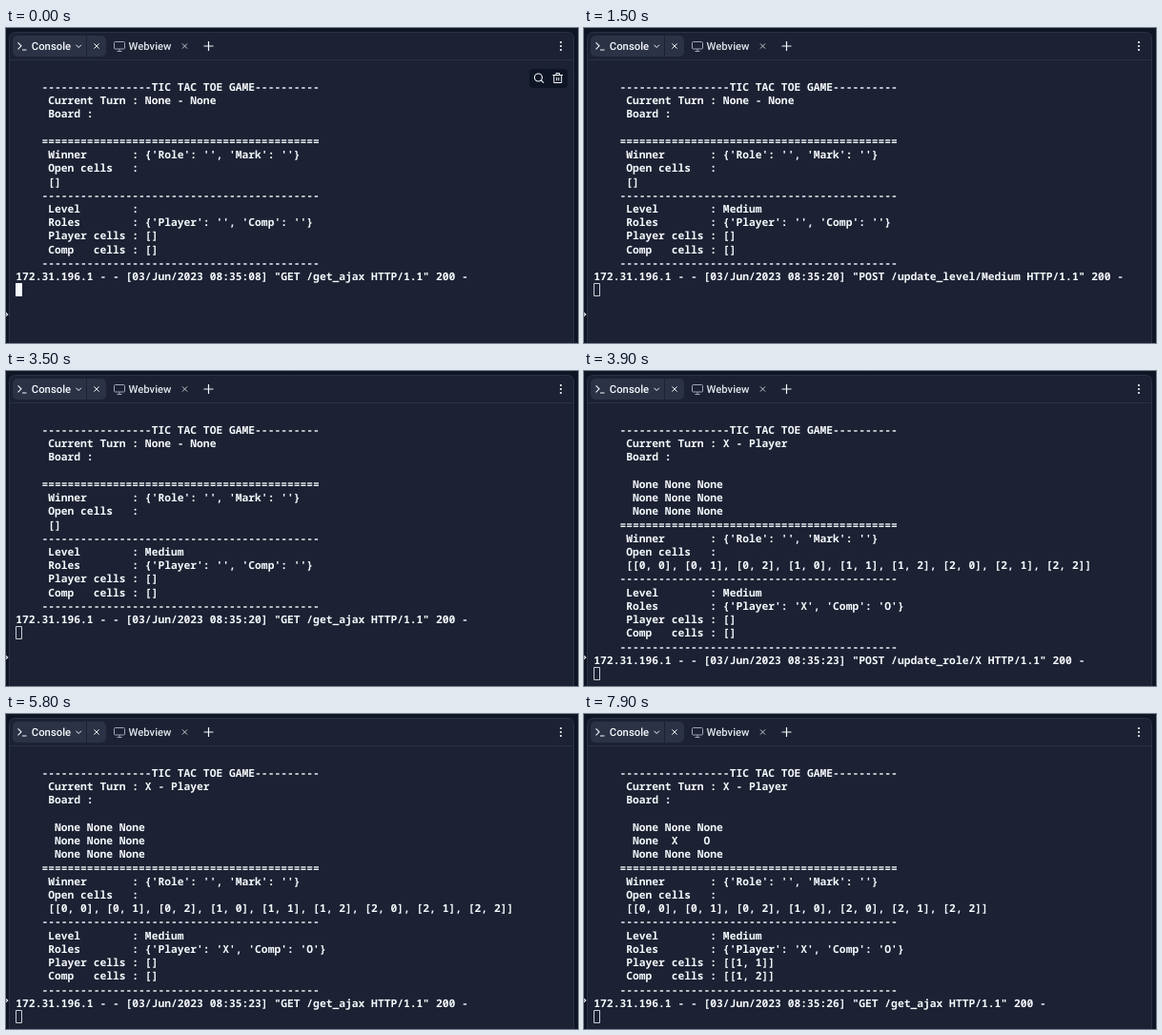
Recreate the animation shown at these times as an HTML page with a canvas. Size 600 by 331 pixels, loop 8 s.

```html
<!DOCTYPE html>
<html lang="en">
<head>
<meta charset="utf-8">
<title>Console</title>
<style>
  html, body { margin: 0; width: 100%; height: 100%; overflow: hidden; background: #0e1525; }
  canvas { display: block; width: 600px; height: 331px; }
</style>
</head>
<body>
<canvas id="stage"></canvas>
<script>
const W = 600, H = 331, LOOP = 8000;
const canvas = document.getElementById('stage');
const ctx = canvas.getContext('2d');
const ratio = window.devicePixelRatio || 1;
canvas.width = W * ratio;
canvas.height = H * ratio;

const color = { page: '#0e1525', panel: '#1c2133', raised: '#2b3245', text: '#f5f9fc', dim: '#9ea5b3' };
const term = { x: 10.3, y: 51.7, row: 14.23, font: '600 11.3px "Noto Sans Mono", monospace' };

const EMPTY_BOARD = ['None None None', 'None None None', 'None None None'];
const ALL_CELLS = [0, 1, 2].flatMap(r => [0, 1, 2].map(c => [r, c]));

function cellList(cells) {
  return '[' + cells.map(([r, c]) => `[${r}, ${c}]`).join(', ') + ']';
}

function freeCells(...taken) {
  return ALL_CELLS.filter(cell => !taken.some(t => t[0] === cell[0] && t[1] === cell[1]));
}

function screen(game, second, request) {
  const g = { turn: 'None - None', board: [], open: [], level: '', player: '', comp: '',
              playerCells: [], compCells: [], ...game };
  const indent = ' '.repeat(4);
  const rule = '-'.repeat(43);
  const body = [
    '-'.repeat(17) + 'TIC TAC TOE GAME' + '-'.repeat(10),
    ' Current Turn : ' + g.turn,
    ' Board :',
    '',
    ...g.board.map(row => '  ' + row),
    '='.repeat(43),
    " Winner       : {'Role': '', 'Mark': ''}",
    ' Open cells   :',
    ' ' + cellList(g.open),
    rule,
    ' Level        : ' + g.level,
    ` Roles        : {'Player': '${g.player}', 'Comp': '${g.comp}'}`,
    ' Player cells : ' + cellList(g.playerCells),
    ' Comp   cells : ' + cellList(g.compCells),
    rule
  ].map(line => indent + line);
  const log = `172.31.196.1 - - [03/Jun/2023 08:35:${second}] "${request} HTTP/1.1" 200 -`;
  return ['', ...body, log];
}

const GET = 'GET /get_ajax';
const medium = { level: 'Medium' };
const started = { ...medium, turn: 'X - Player', player: 'X', comp: 'O', board: EMPTY_BOARD, open: ALL_CELLS };
const moved = { ...started, turn: 'O - Comp', board: ['None None None', 'None  X   None', 'None None None'],
                open: freeCells([1, 1]), playerCells: [[1, 1]] };
const answered = { ...moved, turn: 'X - Player', board: ['None None None', 'None  X    O', 'None None None'],
                   open: freeCells([1, 1], [1, 2]), compCells: [[1, 2]] };

const timeline = [
  [0, screen({}, '08', GET)],
  [1000, screen(medium, '20', 'POST /update_level/Medium')],
  [1800, screen(medium, '20', GET)],
  [3800, []],
  [3900, screen(started, '23', 'POST /update_role/X')],
  [4800, screen(started, '23', GET)],
  [6100, screen(moved, '26', 'POST /update_board/1/1')],
  [6600, []],
  [6700, screen(answered, '26', GET)]
];
const FOCUS_END = 300;

function box(x, y, w, h, r, fill, stroke) {
  ctx.beginPath();
  ctx.roundRect(x, y, w, h, r);
  if (fill) { ctx.fillStyle = fill; ctx.fill(); }
  if (stroke) { ctx.strokeStyle = stroke; ctx.stroke(); }
}

function lines(stroke, width, ...paths) {
  ctx.strokeStyle = stroke;
  ctx.lineWidth = width;
  ctx.beginPath();
  for (const [x, y, ...rest] of paths) {
    ctx.moveTo(x, y);
    for (let i = 0; i < rest.length; i += 2) ctx.lineTo(rest[i], rest[i + 1]);
  }
  ctx.stroke();
}

function label(text, x, y, fill, font) {
  ctx.font = font;
  ctx.fillStyle = fill;
  ctx.fillText(text, x, y);
}

function cross(x, y, stroke) {
  const r = 2.6;
  lines(stroke, 1, [x - r, y - r, x + r, y + r], [x + r, y - r, x - r, y + r]);
}

function drawFrame() {
  ctx.fillStyle = color.page;
  ctx.fillRect(0, 0, W, H);
  ctx.lineWidth = 1;
  box(3.5, 4.5, 592, 340, 6, color.panel, color.raised);
  lines(color.raised, 1, [4, 33.5, 595, 33.5]);
  lines(color.text, 1.1, [-1, 298.5, 1.8, 301, -1, 303.5]);

  const tabFont = '500 11.3px Roboto, sans-serif';
  box(7, 8, 98, 22, 5, color.raised);
  lines(color.panel, 1, [84.5, 8, 84.5, 30]);
  lines(color.text, 1.1, [12.5, 15.3, 16, 18.8, 12.5, 22.3], [17, 23, 21.5, 23]);
  label('Console', 26.8, 23, color.text, tabFont);
  lines(color.text, 1, [73.5, 17.8, 76.2, 20.5, 78.9, 17.8]);
  cross(95, 19, color.text);

  ctx.lineWidth = 1;
  box(113.5, 14.5, 11, 7.5, 1, null, color.dim);
  lines(color.dim, 1, [119, 22, 119, 24.5], [116.5, 24.5, 121.5, 24.5]);
  label('Webview', 128.4, 23, '#dfe3e9', tabFont);
  cross(187.5, 19, '#c2c8cc');
  lines(color.text, 1.2, [207.5, 19, 217.5, 19], [212.5, 14, 212.5, 24]);

  ctx.fillStyle = color.text;
  for (const y of [15, 19, 23]) {
    ctx.beginPath();
    ctx.arc(582, y, 1.1, 0, 7);
    ctx.fill();
  }
}

function drawTools() {
  box(549, 43, 40, 20, 4, color.page);
  ctx.strokeStyle = color.text;
  ctx.lineWidth = 1.1;
  ctx.beginPath();
  ctx.arc(558.4, 52, 4, 0, 7);
  ctx.stroke();
  lines(color.text, 1.1, [561.3, 54.9, 564, 57.6]);
  lines(color.text, 1, [573.5, 49.5, 584, 49.5], [574.8, 49.5, 574.8, 57.5, 582.7, 57.5, 582.7, 49.5],
    [577, 49.5, 577, 47.5, 580.5, 47.5, 580.5, 49.5], [577.7, 52, 577.7, 55.3], [579.8, 52, 579.8, 55.3]);
}

function drawTerminal(rows, focused) {
  rows.forEach((row, i) => label(row, term.x, term.y + i * term.row, color.text, term.font));
  const top = Math.round(40.4 + rows.length * term.row);
  if (focused) {
    ctx.fillStyle = color.text;
    ctx.fillRect(10, top, 7, 14);
  } else {
    ctx.lineWidth = 1;
    box(10.5, top + 0.5, 6, 13, 0, null, '#c9ced6');
  }
}

function render(now) {
  const t = now % LOOP;
  const [, rows] = timeline.findLast(([start]) => start <= t);
  const focused = t < FOCUS_END;
  ctx.setTransform(ratio, 0, 0, ratio, 0, 0);
  ctx.textRendering = 'geometricPrecision';
  drawFrame();
  if (focused) drawTools();
  drawTerminal(rows, focused);
}

let origin;
function tick(now) {
  origin ??= now;
  render(now - origin);
  requestAnimationFrame(tick);
}
requestAnimationFrame(tick);
</script>
</body>
</html>
```
